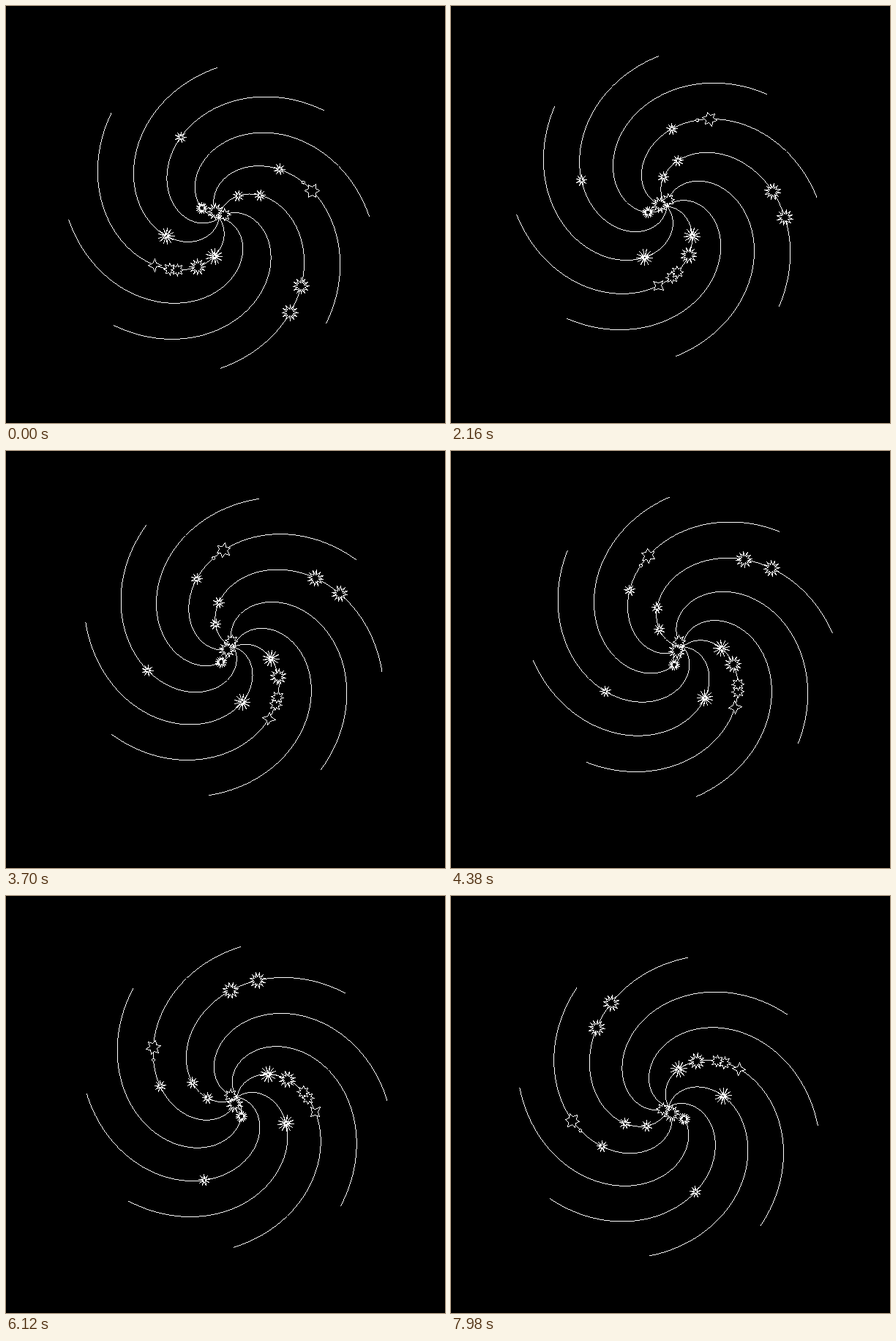
Recreate the animation shown at these times as an HTML page with a canvas. Size 600 by 570 pixels, loop 8 s.

```html
<!DOCTYPE html>
<html>
<head>
<meta charset="utf-8">
<title>Spiral of stars</title>
<style>
html, body { margin: 0; width: 600px; height: 570px; overflow: hidden; background: #000; }
canvas { display: block; }
</style>
</head>
<body>
<canvas id="stage" width="600" height="570"></canvas>
<script>
const ctx = document.getElementById("stage").getContext("2d");
const LOOP = 8000, STEP = 20;
const RADIUS = 205.5, SWEEP = 3, ARMS = 8, SEGMENTS = 120;

// Evenly timed points on the drift of the centre
const drift = [[290.5, 289.2], [289.9, 276.9], [306.3, 268.6], [318.2, 267.9], [313.4, 276.2], [297, 287.6]];

// Each kind of star sits at some [arm, distance from centre] places
const kinds = [
  { points: 9, outer: 7.5, inner: 1.8, at: [[1, 122], [7, 106], [6, 40], [6, 64]] },
  { points: 13, outer: 11, inner: 1.5, at: [[2, 76], [3, 53]] },
  { points: 12, outer: 11, inner: 4.8, at: [[3, 73], [6, 146], [6, 162], [7, 10]] },
  { points: 8, outer: 8.5, inner: 4.5, at: [[3, 97], [3, 91], [5, 9]] },
  { points: 16, outer: 7.5, inner: 3, at: [[0, 27]] },
  { points: 6, outer: 10, inner: 5.5, at: [[7, 133]] },
  { points: 4, outer: 9, inner: 4, at: [[3, 109]] },
  { points: 8, outer: 2, inner: 2, at: [[7, 125]] }
];

// Catmull-Rom curve through the drift points, u from 0 to 1
function centre(u) {
  const last = drift.length - 1;
  const i = Math.min(Math.floor(u * last), last - 1), f = u * last - i;
  const b = drift[i], c = drift[i + 1];
  const a = drift[i - 1] || b, d = drift[i + 2] || c;
  return b.map((p, k) => p + f / 2 * (c[k] - a[k] +
    f * (2 * a[k] - 5 * p + 4 * c[k] - d[k] + f * (3 * (p - c[k]) + d[k] - a[k]))));
}

// Steady counter-clockwise turn with a slight sway, in radians
const heading = s => (1.1 + 21.565 * s - 0.55 * Math.cos(s * Math.PI / 2)) * Math.PI / 180;

const polar = (x, y, r, a) => [x + r * Math.cos(a), y - r * Math.sin(a)];

// Hard-edged polyline: one pixel per step along the longer axis
function trace(points) {
  for (let k = 1; k < points.length; k++) {
    let p = points[k - 1], q = points[k];
    const major = Math.abs(q[1] - p[1]) > Math.abs(q[0] - p[0]) ? 1 : 0, minor = 1 - major;
    if (p[major] > q[major]) [p, q] = [q, p];
    const slope = (q[minor] - p[minor]) / (q[major] - p[major] || 1);
    for (let m = Math.ceil(p[major]); m <= q[major]; m++) {
      const n = Math.round(p[minor] + (m - p[major]) * slope);
      ctx.fillRect(major ? n : m, major ? m : n, 1, 1);
    }
  }
}

function drawStar(x, y, turn, { points, outer, inner }) {
  const outline = Array.from({ length: 2 * points + 1 }, (_, i) =>
    polar(x, y, i % 2 ? inner : outer, turn + i * Math.PI / points).map(Math.round));
  ctx.fillStyle = "#000";
  ctx.beginPath();
  outline.forEach(([px, py]) => ctx.lineTo(px + 0.5, py + 0.5));
  ctx.fill();
  ctx.fillStyle = "#fff";
  trace(outline);
}

function draw(ms) {
  const [cx, cy] = centre(ms / LOOP), turn = heading(ms / 1000);
  const onArm = (arm, r) =>
    polar(cx, cy, r, turn + arm * 2 * Math.PI / ARMS + SWEEP * (1 - r / RADIUS));

  ctx.fillStyle = "#000";
  ctx.fillRect(0, 0, 600, 570);
  ctx.fillStyle = "#fff";
  for (let arm = 0; arm < ARMS; arm++) {
    trace(Array.from({ length: SEGMENTS + 1 }, (_, i) => onArm(arm, RADIUS * i / SEGMENTS)));
  }
  for (const kind of kinds) {
    for (const [arm, r] of kind.at) drawStar(...onArm(arm, r), turn, kind);
  }
}

function frame() {
  const ms = performance.now() % LOOP;
  draw(Math.floor(ms / STEP) * STEP);
  requestAnimationFrame(frame);
}
frame();
</script>
</body>
</html>
```
